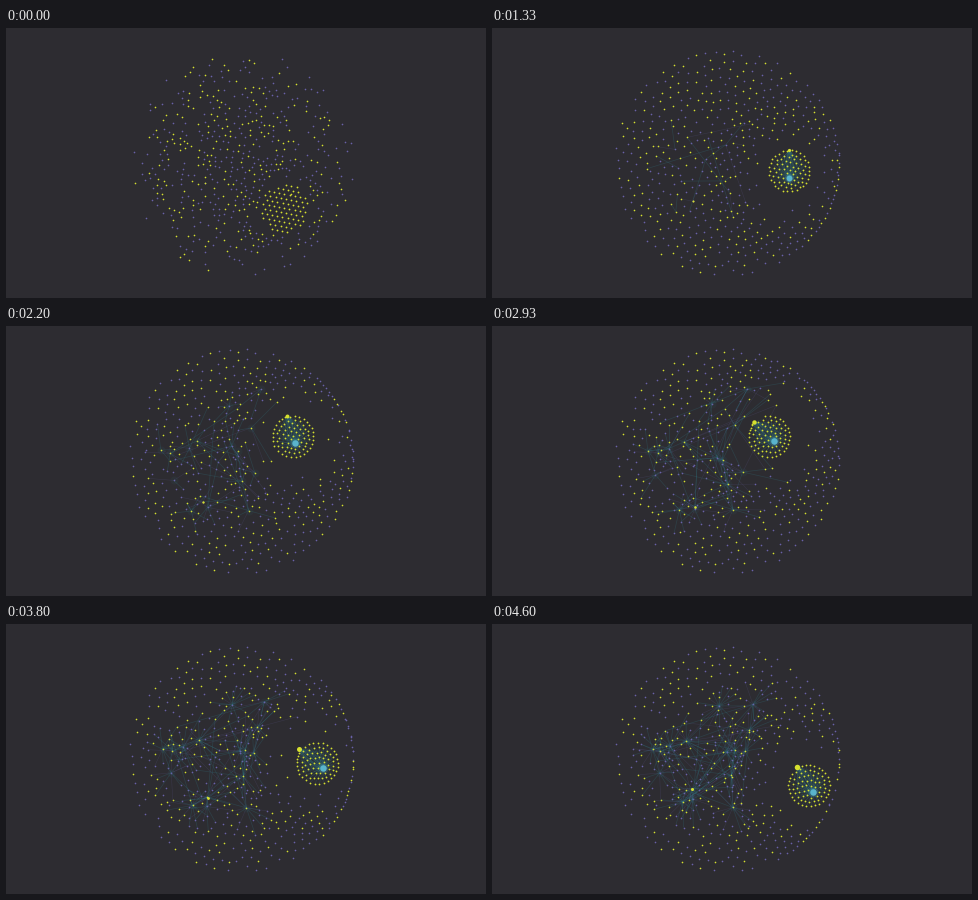
Write a matplotlib script that moves like this. It is 480 px wide and 270 px high and loops after 4.67 s.

```python
import numpy as np
import matplotlib.pyplot as plt
from matplotlib.animation import FuncAnimation
from matplotlib.collections import LineCollection

W, H, DPI = 480, 270, 100
FRAMES, LOOP = 70, 4670
SUBSTEPS = 5
DOTS, GROUP = 520, 76
DISC, DISC_R = np.array([235.0, 135.0]), 112
BG = "#2d2c31"
YELLOW, PURPLE, BLUE, TEAL = "#d6e02f", "#6961a8", "#5ab4cc", "#2f93a3"

rng = np.random.default_rng(8)
time = np.arange(FRAMES) * LOOP / FRAMES
KEYS = np.array([0, 600, 1330, 2200, 2930, 3800, 4600])


def track(*values):
    """Smooth path through the key times, sampled once per frame."""
    v = np.array(values, float)
    slope = np.gradient(v, KEYS, axis=0)
    i = np.clip(np.searchsorted(KEYS, time, side="right") - 1, 0, len(KEYS) - 2)
    span = (KEYS[i + 1] - KEYS[i]).astype(float)[:, None]
    u = (time - KEYS[i])[:, None] / span
    return ((2 * u**3 - 3 * u**2 + 1) * v[i] + (3 * u**2 - 2 * u**3) * v[i + 1]
            + span * ((u**3 - 2 * u**2 + u) * slope[i] + (u**3 - u**2) * slope[i + 1]))


def ease(start, length):
    u = np.clip((time - start) / length, 0, 1)
    return u * u * (3 - 2 * u)


blue = track((276, 190), (279, 182), (298, 147), (288, 116), (283, 116), (319, 146), (321, 170))
gold = track((285, 166), (296, 165), (297, 119), (280, 89), (262, 97), (295, 127), (306, 144))
minor = track((205, 172), (204, 173), (200, 175), (198, 178), (210, 187), (201, 172), (201, 155))
center = blue + 0.25 * (gold - blue) + (0, -4) * (1 - ease(0, 600))[:, None]
void_r = 26 + 13 * ease(600, 700)
blue_d = 6.5 * (1 - np.exp(-time / 500))
gold_d = 1.6 + 4 * (time / LOOP) ** 0.7
minor_d = 1.7 + 1.4 * time / LOOP


def repel(p, reach, force):
    """Moves that push apart all points closer than reach."""
    x, y = p.T.astype(np.float32)
    dx, dy = x[:, None] - x, y[:, None] - y
    d = np.sqrt(dx * dx + dy * dy) + 1e-3
    w = np.clip(1 / d - 1 / reach, 0, 1) * force
    return np.clip(np.stack([(w * dx).sum(1), (w * dy).sum(1)], axis=1), -3, 3)


def offset(p, c):
    v = p - c
    return v, np.hypot(*v.T)[:, None] + 1e-6


def keep_in(p, c, radius, rate=1.0):
    v, d = offset(p, c)
    p -= rate * v / d * np.maximum(d - radius, 0)


def keep_out(p, c, radius, rate=0.5):
    v, d = offset(p, c)
    p += rate * v / d * np.maximum(radius - d, 0)


def open_void(p, c, radius, spread=2.0):
    """Squeeze the surroundings of c outwards to leave a round hole."""
    v, d = offset(p, c)
    moved = radius + d * (1 - 1 / spread)
    return np.where(d < spread * radius, c + v / d * moved, p)


def sunflower(n, radius):
    k = np.arange(n) + 0.5
    r, a = radius * np.sqrt(k / n), k * np.pi * (3 - np.sqrt(5))
    return np.c_[r * np.cos(a), r * np.sin(a)]


def even_disc():
    p = DISC + sunflower(DOTS, DISC_R) + rng.normal(0, 3, (DOTS, 2))
    for _ in range(25):
        p += repel(p, 10, 0.4)
        keep_in(p, DISC, DISC_R)
    return p


def clumped(homes):
    focus = np.array([222, 130])
    v, d = offset(homes, focus)
    p = focus + v * (0.66 + 0.27 * d / DISC_R) + rng.normal(0, 7, homes.shape)
    p = open_void(p, center[0], void_r[0], 1.6)
    for _ in range(10):
        p += repel(p, 6.5, 0.5)
        keep_in(p, DISC, DISC_R)
    return p


def lattice(step=5.3, tilt=0.2):
    i, j = np.mgrid[-8:9, -8:9].reshape(2, -1)
    q = step * np.c_[i + j / 2, j * np.sqrt(3) / 2]
    q = q[np.argsort(np.hypot(*q.T))[:GROUP]]
    c, s = np.cos(tilt), np.sin(tilt)
    return center[0] + q @ np.array([[c, s], [-s, c]])


def make_links(p, lead, hub_count=15, members=15, long_links=60):
    """Link hubs to near and far dots, each link with its frame of birth."""
    inner = np.flatnonzero(offset(p, np.array([220, 130]))[1][:, 0] < 72)
    hubs = np.r_[lead, rng.choice(inner, hub_count, replace=False)]
    links = [(rng.choice(hubs), rng.choice(inner)) for _ in range(long_links)]
    for h in hubs:
        near = np.argsort(offset(p, p[h])[1][:, 0])[1:55]
        links += [(h, m) for m in rng.choice(near, members, replace=False)]
    return hubs, np.array(links), rng.uniform(14, FRAMES, len(links))


def simulate(homes, lead, links, birth):
    dots, group = clumped(homes), lattice()
    states = [(dots.copy(), group.copy())]
    for f in range(1, FRAMES):
        group += center[f] - center[f - 1]
        homes[lead] = minor[f]
        goal = open_void(homes, center[f], void_r[f])
        a, b = links[birth <= f].T
        for _ in range(SUBSTEPS):
            dots += 0.07 * (goal - dots) + repel(dots, 9, 0.3)
            v, d = offset(dots[b], dots[a])
            pull = 0.045 * v / d * np.clip(d - 7, 0, 30)
            np.add.at(dots, b, -pull)
            np.add.at(dots, a, 0.15 * pull)
            keep_out(dots, center[f], 0.85 * void_r[f])
            keep_in(dots, DISC, DISC_R)
            group += repel(group, 6, 0.35)
            keep_out(group, blue[f], 0.9 * blue_d[f])
            keep_out(group, gold[f], 0.8 * gold_d[f])
            keep_in(group, center[f], 20.5, 0.5)
        states.append((dots.copy(), group.copy()))
    return states


homes = even_disc()
lead = int(np.argmin(offset(homes, minor[0])[1]))
hubs, links, birth = make_links(homes, lead)
states = simulate(homes, lead, links, birth)
is_gold = rng.uniform(size=DOTS) < 0.45
is_teal = rng.uniform(size=len(links)) < 0.65

fig = plt.figure(figsize=(W / DPI, H / DPI), dpi=DPI, facecolor=BG)
ax = fig.add_axes([0, 0, 1, 1])
ax.set(xlim=(0, W), ylim=(H, 0))
ax.axis("off")


def area(d):
    return (0.72 * d) ** 2


def points(color, d, z, **kw):
    return ax.scatter([], [], s=area(d), c=color, lw=0, zorder=z, **kw)


def lines(color, alpha, width):
    return ax.add_collection(LineCollection([], colors=color, alpha=alpha, linewidths=width, zorder=1))


web_purple, web_teal = lines(PURPLE, 0.2, 0.4), lines(TEAL, 0.2, 0.5)
fan_blue, fan_gold = lines(TEAL, 0.17, 0.5), lines(TEAL, 0.13, 0.5)
glow = points(TEAL, 8, 1, alpha=0.06)
purple_dots = points(PURPLE, 1.65, 2)
gold_dots = points(YELLOW, 1.65, 3)
group_dots = points(YELLOW, 1.8, 3)
halo = points(BLUE, 9, 4, alpha=0.2)
blue_hub = points(BLUE, 6, 5)
gold_hub = points(YELLOW, 4, 5)
minor_hub = points(YELLOW, 2, 5)


def place(dot, pos, d):
    dot.set_offsets([pos])
    dot.set_sizes([area(d)])


def fan(hub, nodes):
    return [(hub, q) for q in nodes]


def draw(f):
    dots, group = states[f]
    purple_dots.set_offsets(dots[~is_gold])
    gold_dots.set_offsets(dots[is_gold])
    group_dots.set_offsets(group)

    live = birth <= f
    web_purple.set_segments(list(dots[links[live & ~is_teal]]))
    web_teal.set_segments(list(dots[links[live & is_teal]]))
    glow.set_offsets(dots[hubs[1:]] if f > 20 else np.empty((0, 2)))

    count = int(np.clip((f - 3) * 5, 0, GROUP))
    fan_blue.set_segments(fan(blue[f], group[:count]))
    fan_gold.set_segments(fan(gold[f], group[:count // 2]))

    place(halo, blue[f], 1.5 * blue_d[f])
    place(blue_hub, blue[f], blue_d[f])
    place(gold_hub, gold[f], gold_d[f])
    place(minor_hub, dots[lead], minor_d[f])
    return ()


anim = FuncAnimation(fig, draw, frames=FRAMES, interval=LOOP / FRAMES,
                     repeat=True, repeat_delay=0, blit=False)
plt.show()
```
